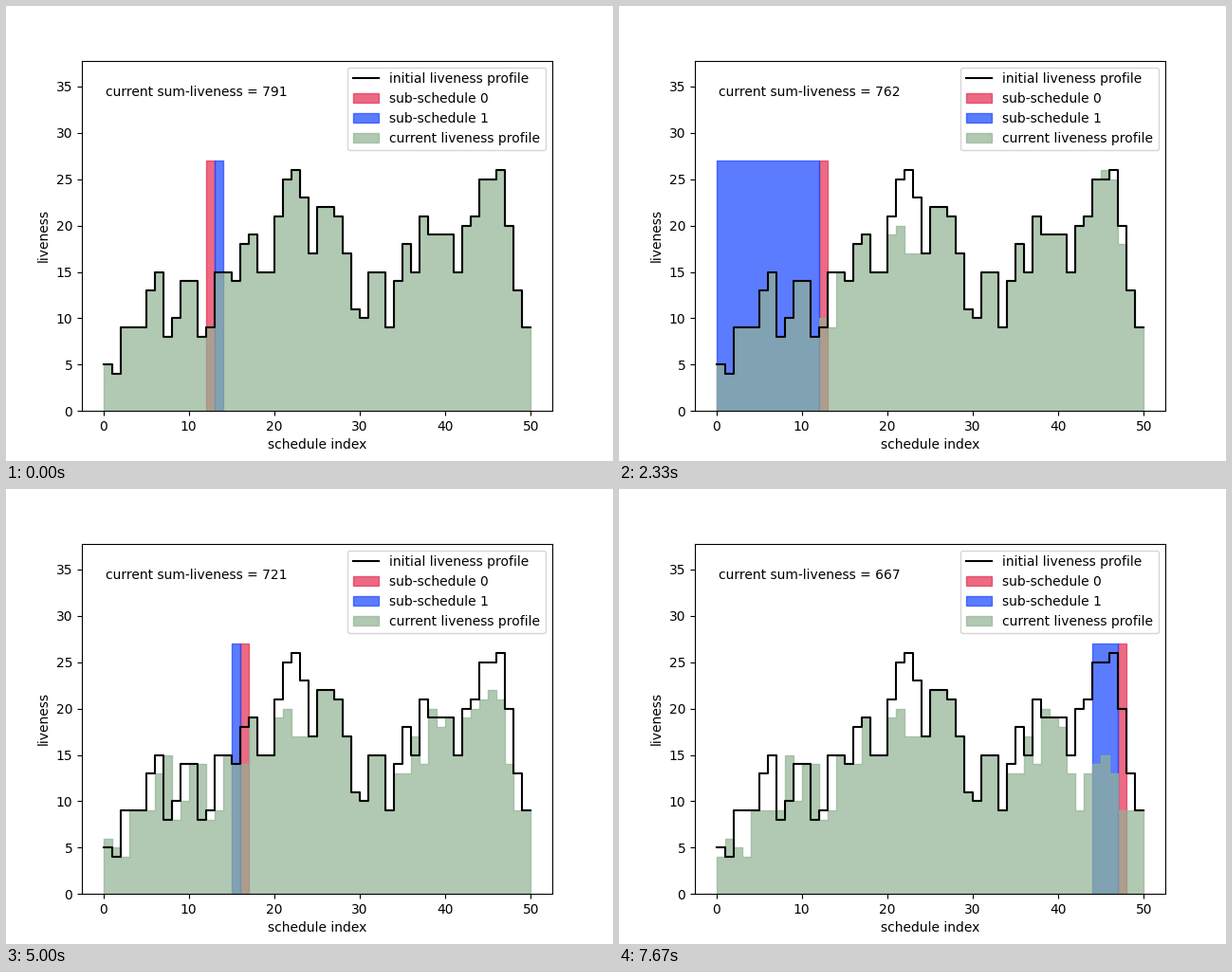
A matplotlib script for the animation above (8000 ms loop, 640x480 px).

```python
import matplotlib.pyplot as plt
from matplotlib.animation import FuncAnimation

RED, BLUE, GREEN = "#e52b50", "#1745ff", "#91b392"
ALPHA = 0.7
TOP = 27
LOOP_MS = 8000

INITIAL = [
    5, 4, 9, 9, 9, 13, 15, 8, 10, 14,
    14, 8, 9, 15, 15, 14, 18, 19, 15, 15,
    21, 25, 26, 23, 17, 22, 22, 21, 17, 11,
    10, 15, 15, 9, 14, 18, 15, 21, 19, 19,
    19, 15, 20, 21, 25, 25, 26, 20, 13, 9,
]

# (from, to, liveness of the moved op, shift of the ops it passes,
#  shifts of the leading passed ops where they differ)
MOVES = [
    (12, 13, 9, -5, ()),
    (44, 47, 18, 5, (0, 0)),
    (20, 23, 17, -6, ()),
    (12, 0, 6, 0, ()),
    (39, 33, 9, -1, (4,)),
    (44, 48, 9, 1, ()),
    (47, 42, 19, -5, (0, 0)),
    (15, 16, 14, -4, ()),
    (8, 0, 4, 0, ()),
    (7, 6, 9, 0, ()),
    (46, 39, 19, -6, (0,)),
    (44, 47, 9, -1, ()),
]


def apply_move(profile, move):
    src, dst, level, shift, lead = move
    result = list(profile)
    result.pop(src)
    start, count = min(src, dst), abs(src - dst)
    for k in range(count):
        result[start + k] += lead[k] if k < len(lead) else shift
    result.insert(dst, level)
    return result


profiles = [INITIAL]
for move in MOVES:
    profiles.append(apply_move(profiles[-1], move))

fig, ax = plt.subplots(figsize=(6.4, 4.8), dpi=100)
xs = range(len(INITIAL) + 1)


def closed(profile):
    return profile + profile[-1:]


def draw_span(start, end, color, label):
    return ax.fill_between([start, end], 0, TOP, color=color, alpha=ALPHA, label=label)


def draw_state(frame):
    step, moved = divmod(frame, 2)
    src, dst = MOVES[step][:2]
    lo, hi = min(src, dst), max(src, dst) + 1
    pos = dst if moved else src
    blue = (lo + 1, hi) if pos == lo else (lo, hi - 1)
    profile = profiles[step + moved]
    caption.set_text(f"current sum-liveness = {sum(profile)}")
    return [
        draw_span(pos, pos + 1, RED, "sub-schedule 0"),
        draw_span(*blue, BLUE, "sub-schedule 1"),
        ax.fill_between(xs, 0, closed(profile), step="post", color=GREEN,
                        alpha=ALPHA, label="current liveness profile"),
    ]


ax.step(xs, closed(INITIAL), where="post", color="black",
        label="initial liveness profile")
caption = ax.text(0.05, 0.9, "", transform=ax.transAxes)
ax.set(xlim=(-2.5, 52.5), ylim=(0, 1.4 * TOP),
       xlabel="schedule index", ylabel="liveness")
areas = draw_state(0)
ax.legend(loc="upper right")


def update(frame):
    for area in areas:
        area.remove()
    areas[:] = draw_state(frame)
    return [*areas, caption]


frame_count = 2 * len(MOVES)
anim = FuncAnimation(fig, update, frames=frame_count,
                     interval=LOOP_MS / frame_count, repeat=True, repeat_delay=0)
plt.show()
```
